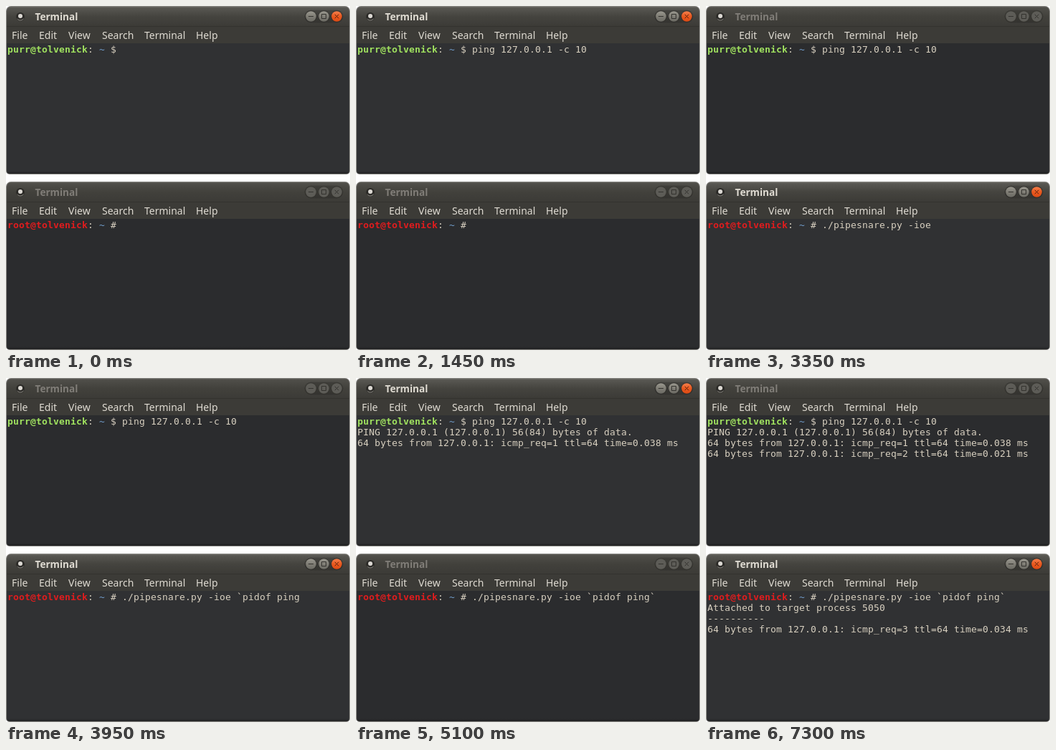
An HTML page with a canvas for the animation above (8000 ms loop, 480x480 px).

```html
<!DOCTYPE html>
<html lang="en">
<head>
<meta charset="utf-8">
<title>Two terminals</title>
<style>
html, body { margin: 0; width: 100%; height: 100%; overflow: hidden; background: #fff; }
canvas { display: block; width: 480px; height: 480px; }
</style>
</head>
<body>
<canvas id="stage" width="480" height="480"></canvas>
<script>
const ctx = document.getElementById('stage').getContext('2d');

const LOOP = 8000;
const KEY_MS = 50;
const CELL = 8, LINE = 15;
const W = 480, H = 235;
const MONO = '"DejaVu Sans Mono", monospace';
const SANS = '"Noto Sans", "Open Sans", sans-serif';
const INK = '#d8d0c0', GREEN = '#a0e25f', RED = '#e01c1e', BLUE = '#729fcf';
const MENU = [['File', 8], ['Edit', 46], ['View', 87], ['Search', 134], ['Terminal', 193], ['Help', 265]];

const upper = {
  y: 0, user: 'purr@tolvenick', color: GREEN, sign: '$',
  command: 'ping 127.0.0.1 -c 10', start: 500,
  output: [
    [5000, 'PING 127.0.0.1 (127.0.0.1) 56(84) bytes of data.'],
    [5100, '64 bytes from 127.0.0.1: icmp_req=1 ttl=64 time=0.038 ms'],
    [6100, '64 bytes from 127.0.0.1: icmp_req=2 ttl=64 time=0.021 ms']
  ]
};
const lower = {
  y: 245, user: 'root@tolvenick', color: RED, sign: '#',
  command: './pipesnare.py -ioe `pidof ping`', start: 2450,
  output: [
    [7100, 'Attached to target process 5050'],
    [7100, '-'.repeat(10)],
    [7300, '64 bytes from 127.0.0.1: icmp_req=3 ttl=64 time=0.034 ms']
  ]
};

function fade(y0, y1, ...colors) {
  const g = ctx.createLinearGradient(0, y0, 0, y1);
  colors.forEach((c, i) => g.addColorStop(i / (colors.length - 1), c));
  return g;
}

function rect(x, y, w, h, fill) {
  ctx.fillStyle = fill;
  ctx.fillRect(x, y, w, h);
}

function disc(x, y, r, fill) {
  ctx.fillStyle = fill;
  ctx.beginPath();
  ctx.arc(x, y, r, 0, Math.PI * 2);
  ctx.fill();
}

function roundRect(x, y, w, h, radii) {
  ctx.beginPath();
  ctx.roundRect(x, y, w, h, radii);
}

function label(text, x, y, font, color) {
  ctx.font = font;
  ctx.fillStyle = color;
  ctx.fillText(text, x, y);
}

// Terminal text sits on a fixed character grid.
function cells(text, col, row, color, bold) {
  ctx.font = (bold ? 'bold ' : '') + '13px ' + MONO;
  ctx.fillStyle = color;
  [...text].forEach((ch, i) => {
    if (ch !== ' ') ctx.fillText(ch, 2 + (col + i) * CELL, 65 + row * LINE);
  });
}

function menuIcon() {
  disc(20, 15, 6, '#2b2a27');
  ctx.strokeStyle = '#8f8d87';
  ctx.lineWidth = 1;
  ctx.beginPath();
  ctx.arc(20, 14.5, 5.5, Math.PI * 0.2, Math.PI * 0.8);
  ctx.stroke();
  disc(20, 14, 3, '#dcd9d3');
}

function button(x, kind, focused) {
  const y = 14.5;
  let fill = '#5d5c57';
  if (focused) {
    fill = kind === 'close' ? fade(7, 22, '#f4814f', '#e9591f', '#dd4a14')
                            : fade(7, 22, '#9a988f', '#7f7d75', '#6b6a63');
  }
  disc(x, y, 8, focused ? '#2e2d2a' : '#35342f');
  disc(x, y, 7.3, fill);
  ctx.strokeStyle = focused && kind === 'close' ? '#57230f' : '#34332f';
  ctx.lineWidth = 1;
  ctx.beginPath();
  if (kind === 'min') {
    ctx.moveTo(x - 3.5, y);
    ctx.lineTo(x + 3.5, y);
  } else if (kind === 'max') {
    ctx.rect(x - 3, y - 3, 6, 6);
  } else {
    ctx.moveTo(x - 2.7, y - 2.7);
    ctx.lineTo(x + 2.7, y + 2.7);
    ctx.moveTo(x + 2.7, y - 2.7);
    ctx.lineTo(x - 2.7, y + 2.7);
  }
  ctx.stroke();
}

function frame(focused) {
  roundRect(0, 0, W, H, [7, 7, 5, 5]);
  ctx.fillStyle = '#858480';
  ctx.fill();

  ctx.save();
  roundRect(1, 1, W - 2, H - 2, [6, 6, 4, 4]);
  ctx.clip();
  rect(0, 0, W, 28, focused ? fade(1, 28, '#5b5a55', '#45443f', '#3c3b37')
                            : fade(1, 28, '#51504b', '#42413c', '#3c3b37'));
  rect(0, 1, W, 1, focused ? '#6b6a64' : '#5d5c57');
  rect(0, 28, W, 1, '#34332f');
  rect(0, 29, W, 23, '#3c3b37');
  rect(0, 52, W, H - 52, focused ? '#303133' : '#2b2c2e');
  rect(0, H - 5, W, 4, fade(H - 5, H - 1, 'rgba(20,20,20,0)', 'rgba(20,20,20,0.5)'));
  ctx.restore();

  menuIcon();
  label('Terminal', 40.5, 20, 'bold 13.6px ' + SANS, focused ? '#dfdbd2' : '#807d78');

  roundRect(416.5, 5.5, 54, 18, 9);
  ctx.fillStyle = 'rgba(0,0,0,0.16)';
  ctx.fill();
  button(425.5, 'min', focused);
  button(443.5, 'max', focused);
  button(461.5, 'close', focused);

  for (const [text, x] of MENU) label(text, x, 46, '14px ' + SANS, '#dfdbd2');
}

function terminal(win, t, focused) {
  ctx.save();
  ctx.translate(0, win.y);
  frame(focused);

  const n = win.user.length;
  cells(win.user, 0, 0, win.color, true);
  cells(':', n, 0, INK);
  cells('~', n + 2, 0, BLUE);
  cells(win.sign, n + 4, 0, INK);

  const typed = Math.max(0, Math.floor((t - win.start) / KEY_MS) + 1);
  cells(win.command.slice(0, typed), n + 6, 0, INK);
  win.output.forEach(([at, text], i) => {
    if (t >= at) cells(text, 0, i + 1, INK);
  });
  ctx.restore();
}

function draw(t) {
  const upperFocused = t < 1950 || (t >= 4500 && t < 7100);
  rect(0, 0, 480, 480, '#fff');
  terminal(upper, t, upperFocused);
  terminal(lower, t, !upperFocused);
}

function tick() {
  draw(performance.now() % LOOP);
  requestAnimationFrame(tick);
}

tick();
</script>
</body>
</html>
```
